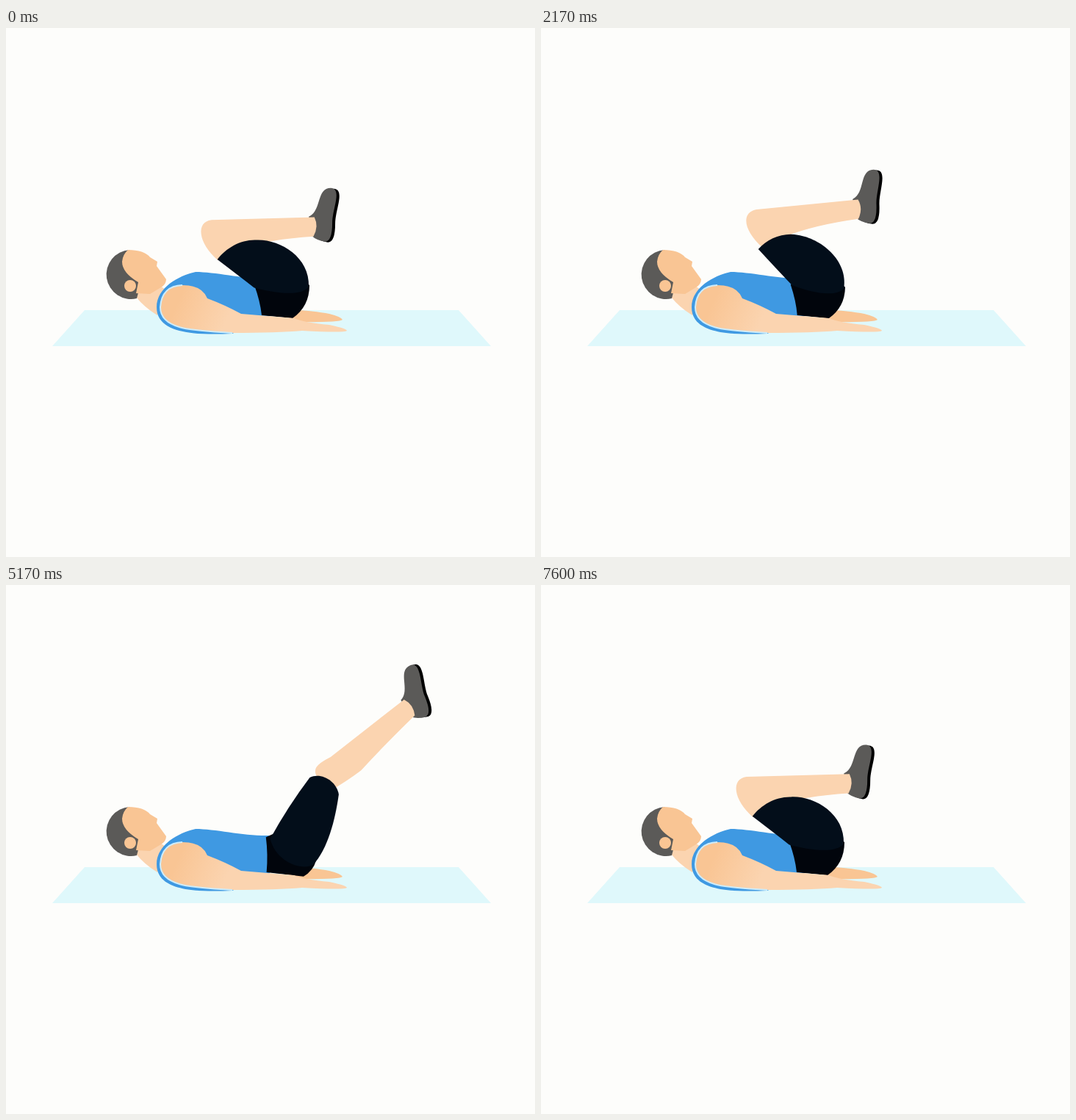
These frames come from a looping animation (720 px wide and 720 px high, 7.96 s). An HTML page without scripts:

```html
<!DOCTYPE html>
<html lang="en">
<head>
<meta charset="utf-8">
<title>Leg extension exercise</title>
<style>
  /* --p: 0 = legs tucked, 1 = legs stretched */
  @property --p { syntax: "<number>"; inherits: true; initial-value: 0; }

  html, body { margin: 0; width: 100%; height: 100%; overflow: hidden; background: #fdfdfb; }

  svg {
    --skin: #fbd4b0; --tan: #f9c594; --hair: #5b5a58; --shirt: #3f99e2; --shine: #cdecfa;
    display: block; width: 100%; height: 100%;
  }

  /* four repetitions fill the 7960 ms loop */
  svg, .morph { animation: stretch 1990ms infinite; }
  @keyframes stretch {
    0%, 3%, 82%, 100% { --p: 0; d: var(--tuck); animation-timing-function: cubic-bezier(.37, 0, .63, 1); }
    34%, 52% { --p: 1; d: var(--reach); animation-timing-function: cubic-bezier(.35, .1, .7, .8); }
  }

  .thigh { transform: rotate(calc(var(--p) * 102deg - 102deg)); transform-origin: 379px 360px; }
  .calf  { transform: rotate(calc(100.5deg - var(--p) * 146.5deg)); transform-origin: 0 0; }
  .foot  { transform: rotate(calc(1.5deg + var(--p) * 17.5deg)); transform-origin: 0 0; }

  .shin {
    fill: var(--skin);
    --tuck: path("M2 -13L-138 -13C-160 -11 -157 18 -131 42Q-105 40 -100 27Q-60 15 0 13Q8 0 2 -13Z");
    --reach: path("M2 -13L-122 -14C-140 -18 -168 -32 -156 18Q-130 23 -104 26Q-60 20 0 13Q8 0 2 -13Z");
  }
  .pelvis {
    fill: #01050c;
    --tuck: path("M338 350Q346 372 348 391L390 395Q413 379 413 350L395 335Z");
    --reach: path("M357 342Q359 366 356 391L408 397Q419 391 424 380L374 332Z");
  }
  .leg {
    fill: #030e1a;
    --tuck: path("M442 280C455 295 462 317 457 337C452 368 420 404 380 394C368 380 382 345 394 321Q414 304 442 280Z");
    --reach: path("M441 276C459 270 477 287 475 305C458 337 438 372 416 391C396 398 358 376 359 344Q398 306 441 276Z");
  }
</style>
</head>
<body>
<svg viewBox="0 0 720 720" aria-label="Man on a mat stretching his legs">
  <defs>
    <linearGradient id="shade" gradientUnits="userSpaceOnUse" x1="235" y1="370" x2="300" y2="398">
      <stop stop-color="#f9c594"/>
      <stop offset="1" stop-color="#fbd4b0"/>
    </linearGradient>
    <path id="shoe" d="M-6 -14C12 -22 4 -53 24 -53C40 -52 26 -24 26 -6Q26 20 16 20Q4 18 -2 12Z"/>
  </defs>

  <path fill="#dff8fb" d="M107 384H616L660 433H63Z"/>

  <!-- far hand -->
  <path fill="var(--tan)" d="M385 383Q420 385 440 389Q456 393 458 397Q454 401 385 400Z"/>

  <!-- head -->
  <path fill="var(--skin)" d="M177 350L209 350L222 360L206 391Q188 380 177 366Z"/>
  <path fill="var(--hair)" d="M168 302A33.500 33.500 0 1 0 178 368L184 345Z"/>
  <path fill="var(--tan)" d="M166 302Q188 302 196 312L206 318L205 324L218 342Q218 349 211 353L196 362L177 361L180 346Q158 333 158 318Q159 308 166 302Z"/>
  <circle cx="169" cy="351" r="8" fill="var(--tan)"/>

  <!-- shirt -->
  <path fill="var(--shirt)" d="M258 332C285 332 325 342 359 341V392L308 416C260 418 205 417 205 380C205 352 238 336 258 332Z"/>

  <!-- legs -->
  <g class="thigh">
    <g transform="translate(475 282.600)">
      <g class="calf">
        <g transform="translate(135 -8)">
          <g class="foot">
            <use href="#shoe" x="4" y="1"/>
            <use href="#shoe" fill="var(--hair)"/>
          </g>
          <path class="morph shin"/>
        </g>
      </g>
    </g>
  </g>
  <path class="morph pelvis"/>
  <g class="thigh"><path class="morph leg"/></g>

  <!-- near arm -->
  <path fill="url(#shade)" stroke="none" d="M240 350Q267 350 274 368Q298 377 320 389L392 395Q405 401 440 404Q464 409 464 412Q460 415 403 412Q370 415 308 415C260 412 210 412 210 380Q212 351 240 350Z"/>
  <path fill="none" stroke="var(--shine)" stroke-width="2" d="M240 350Q212 351 210 380C210 412 260 412 308 415"/>
</svg>
</body>
</html>
```
